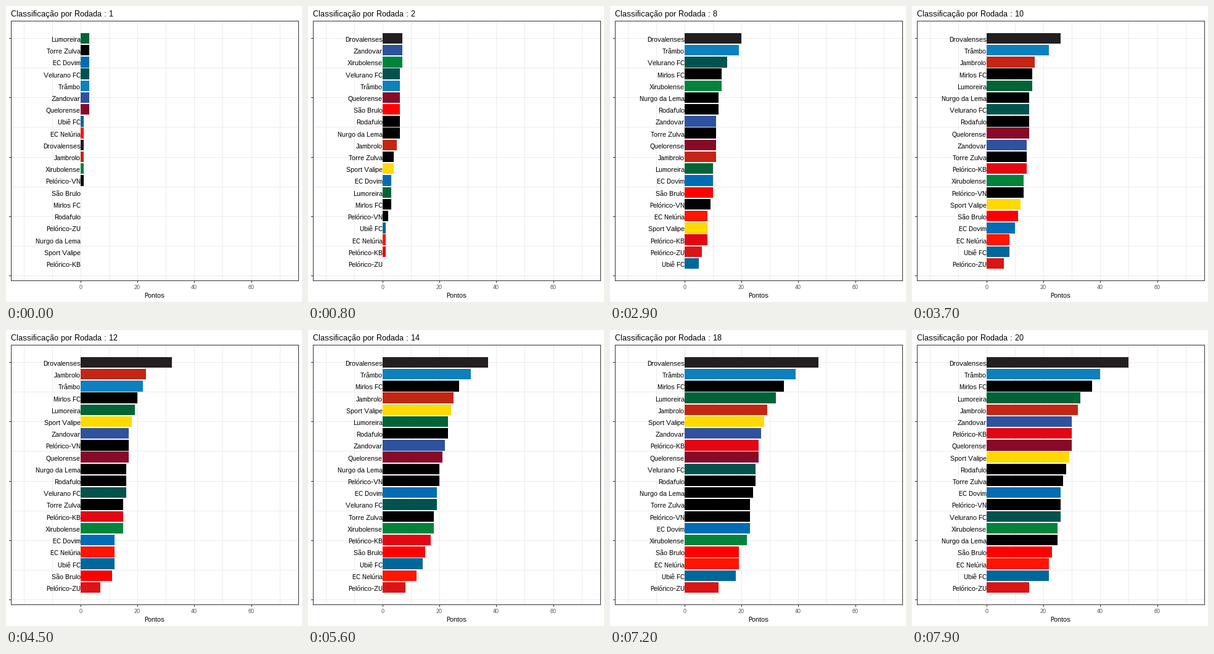
A matplotlib script that plays this animation: 480x480 px, repeating every 8000 ms.

```python
import matplotlib.pyplot as plt
import numpy as np
from matplotlib.animation import FuncAnimation
from matplotlib.patches import Rectangle

# crisp, fully hinted text
plt.rcParams.update({"text.hinting": "native", "text.hinting_factor": 1})

SIZE, DPI = 480, 72            # at 72 dpi one point is one pixel
FRAMES, INTERVAL = 80, 100
TOP, BOTTOM, PITCH = 43.78, 61.16, 19.21  # first bar's edges, row spacing
BASE = 57.95                   # first label's baseline
ZERO, UNIT = 121.06, 4.6076    # x of zero points, pixels per point
GRID, EDGE = "#EBEBEB", "#333333"

# key: (club, bar colour, results by round)
CLUBS = {
    "A": ("Lumoreira", "#006437", "WLLDLWLWWWWLLWDWWWLDL"),
    "B": ("Torre Zulva", "#000000", "WLDWLWLDWLDLLLWWDLDDW"),
    "C": ("EC Dovim", "#006CB5", "WLLWWLDLLLDDWDWLLDWLW"),
    "D": ("Velurano FC", "#00544D", "WLWWWDDDLLDLWLLLLWWLD"),
    "E": ("Trâmbo", "#0D80BF", "WWLWWWWDWLLLWWWDDWWLD"),
    "F": ("Zandovar", "#2F529E", "WDWLLWLDLWLWWDDLDWDLW"),
    "G": ("Quelorense", "#870A28", "WWLWDLLDWDDDLWDLDDWDW"),
    "H": ("Ubiê FC", "#00679A", "DLLWLDLLLWDWLDDWLLDWD"),
    "I": ("EC Nelúria", "#FF1500", "DLLLLWDWLLDWLLLLDWWLW"),
    "J": ("Drovalenses", "#231F20", "DWWWWWWDWWWWWDDWDWWWL"),
    "K": ("Jambrolo", "#C52613", "DWDDLDWDWWWWLDDWDLLLW"),
    "L": ("Xirubolense", "#00843C", "DWWWLLWLLLDDLWLWLDLLW"),
    "M": ("Pelórico-VN", "#000000", "DLDDWLLWDWWDLWLLWLLWL"),
    "N": ("São Brulo", "#FE0000", "LWWLWLDLLDLLDLWDWLLWD"),
    "O": ("Mirlos FC", "#000000", "LWLLWWWDWLDWWDWWDWDDD"),
    "P": ("Rodafulo", "#000000", "LWWDLDDWWLLDWWDDLLDWL"),
    "Q": ("Pelórico-ZU", "#DC1414", "LLLLWLWLLLDLDLLDWLLWL"),
    "R": ("Nurgo da Lema", "#000000", "LWWLLWLWLWDLWDLWLLDDL"),
    "S": ("Sport Valipe", "#FFD900", "LDWLWLDLDWWWWLWLWDLDL"),
    "T": ("Pelórico-KB", "#E30613", "LLDLDLWWWWLDLDDLWWWWD"),
}

# Table order after some rounds; settles ties on points and wins.
TABLES = {
    1: "ABCDEFGHIJKLMNOPQRST",
    5: "JEDLGCNPBFSORKMAHQTI",
    8: "JEDOLRPFBGKACNMISTQH",
    12: "JKEOASFMGRPDBTLCIHNQ",
    15: "JEOKSAPFGRMCDBLTNHIQ",
    17: "JEOAKSPRFMBGLTCNDHIQ",
    21: "JEOAKFTGSPBCMDLRNIHQ",
}


def record(key, rnd):
    """Points and wins of a club after a round."""
    played = CLUBS[key][2][:rnd]
    wins = played.count("W")
    return 3 * wins + played.count("D"), wins


def standing(rnd):
    def rank(key):
        points, wins = record(key, rnd)
        places = [table.index(key) for table in TABLES.values()]
        return -points, -wins, np.interp(rnd, list(TABLES), places)
    return sorted(CLUBS, key=rank)


def x_of(points):
    return round(ZERO + UNIT * points)


fig = plt.figure(figsize=(SIZE / DPI, SIZE / DPI), dpi=DPI, facecolor="white")
ax = fig.add_axes([0, 0, 1, 1])
ax.set_xlim(0, SIZE)
ax.set_ylim(SIZE, 0)
ax.axis("off")


def box(x0, y0, x1, y1, color, z):
    patch = Rectangle((x0, y0), x1 - x0, y1 - y0, facecolor=color,
                      linewidth=0, antialiased=False, zorder=z)
    return ax.add_patch(patch)


def write(x, y, text, size, ha, color="black"):
    return ax.text(x, y, text, fontsize=size, ha=ha, va="baseline",
                   color=color, family="Liberation Sans", zorder=5)


# grid, ticks and frame
for v in range(-20, 80, 10):
    x = x_of(v)
    box(x, 25, x + 1, 445, GRID, 1)
    if v >= 0 and v % 20 == 0:
        box(x, 446, x + 1, 449, EDGE, 4)
        write(x, 459, str(v), 9, "center", "#4D4D4D")
for i in range(9):
    y = int(52.45 + 48.15 * i)
    box(9, y, 474, y + 1, GRID, 1)
    if i % 2 == 0:
        box(5, y, 8, y + 1, EDGE, 4)
for edge in [(8, 24, 475, 25), (8, 445, 475, 446),
             (8, 24, 9, 446), (474, 24, 475, 446)]:
    box(*edge, EDGE, 4)
write(240.5, 473, "Pontos", 11, "center")
title = write(8, 17, "", 13, "left")

bars, labels = [], []
for i in range(len(CLUBS)):
    y0, y1, base = (round(y + PITCH * i) for y in (TOP, BOTTOM, BASE))
    bars.append(box(x_of(0), y0, x_of(0), y1, "black", 3))
    labels.append(write(x_of(0), base, "", 11, "right"))


def draw(frame):
    # the heading trails the bars by one step until the last rounds
    rnd = 21 if frame == FRAMES - 1 else frame // 4 + 1
    shown = 20 if frame >= 76 else max(1, (frame + 3) // 4)
    title.set_text(f"Classificação por Rodada : {shown}")
    for key, bar, label in zip(standing(rnd), bars, labels):
        name, color, _ = CLUBS[key]
        points = record(key, rnd)[0]
        bar.set_width(x_of(points) - x_of(0))
        bar.set_facecolor(color)
        label.set_text(name)
    return [title, *bars, *labels]


anim = FuncAnimation(fig, draw, frames=FRAMES, interval=INTERVAL,
                     repeat=True, repeat_delay=0, blit=False)
plt.show()
```
